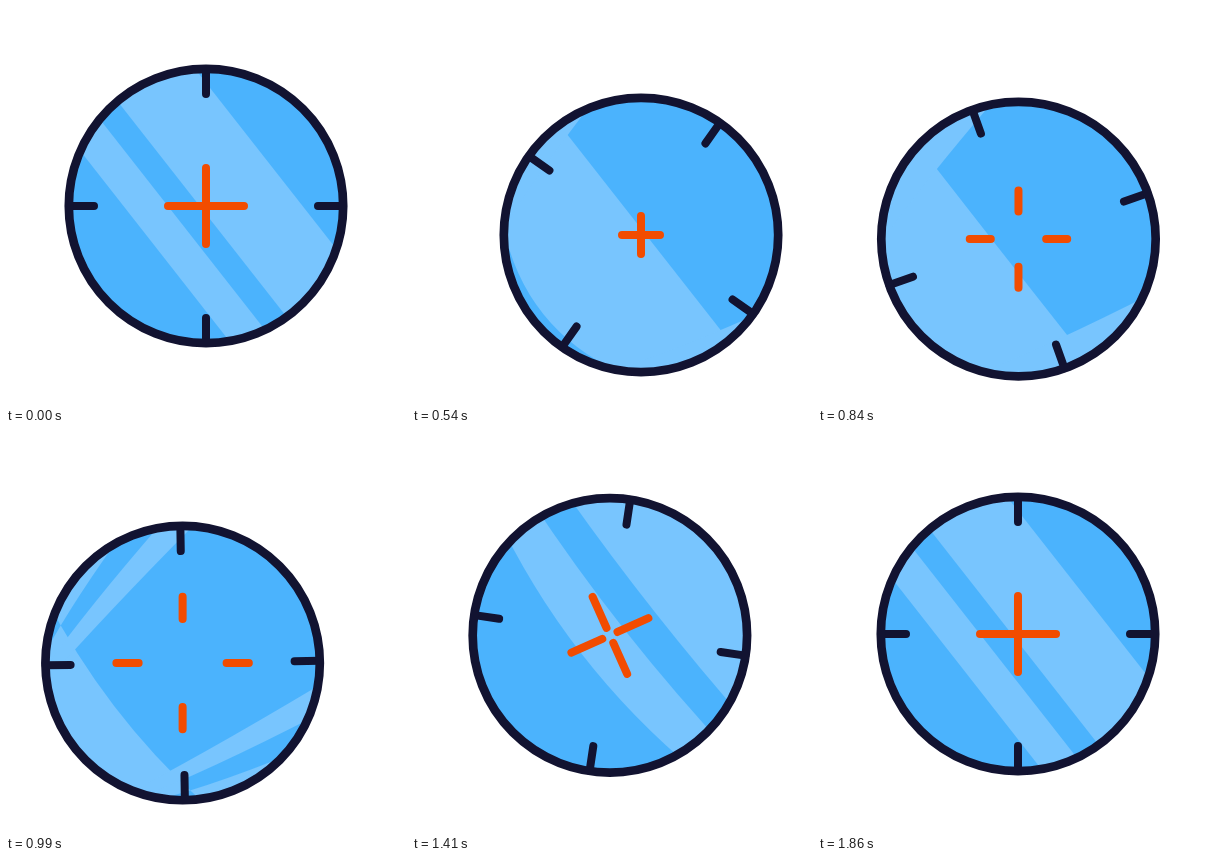
An HTML page with a canvas for the animation above (3.92 s loop, 400 by 400 pixels).

```html
<!DOCTYPE html>
<html>
<head>
<meta charset="utf-8">
<title>Crosshair</title>
<style>
html, body { margin: 0; width: 100%; height: 100%; overflow: hidden; background: #fff; }
canvas { display: block; width: 400px; height: 400px; }
</style>
</head>
<body>
<canvas id="stage"></canvas>
<script>
const LOOP = 3920, STEP = 30, END = 1860;
const INK = '#121331', BLUE = '#4bb3fd', SHINE = '#78c5fe', RED = '#f24c00';
const RAD = Math.PI / 180, TILT = 51.9 * RAD;
const R = 137.2;

// Moments when the lens changes direction.
const AWAY = 400, SWING = 600, TURN = 1080, HOME = 1470;

const canvas = document.getElementById('stage');
const ctx = canvas.getContext('2d');
const dpr = window.devicePixelRatio || 1;
canvas.width = canvas.height = 400 * dpr;

const mix = (a, b, s) => a + (b - a) * s;

// Eased progress from 0 at time a to 1 at time b.
function ease(t, a, b) {
  const u = Math.min(1, Math.max(0, (t - a) / (b - a)));
  return u * u * (3 - 2 * u);
}

function curve([a, b, c, d], s) {
  const r = 1 - s;
  return a * r * r * r + 3 * b * r * r * s + 3 * c * r * s * s + d * s * s * s;
}

function lensAt(t) {
  if (t < SWING) {
    const s = ease(t, 0, AWAY);
    return [curve([200, 210, 228, 229], s), curve([200, 205, 220, 229], s)];
  }
  if (t < TURN) {
    const s = ease(t, SWING, TURN);
    return [curve([229, 214.4, 186.4, 172.4], s), curve([229, 235.6, 233.9, 227.4], s)];
  }
  const s = ease(t, TURN, HOME);
  return [curve([172.4, 177.4, 189, 200], s), curve([227.4, 217.4, 207, 200], s)];
}

// Shine edges at rest, as distances from the lens centre.
const bands = [[76, -5], [-30, -65]];

// Before the turn the bands spread and slide out at the lower left.
function leaving(rest, t) {
  const go = ease(t, 0, AWAY);
  const slide = Math.max(0, (t - 660) / 460);
  const pos = mix(rest, 4 + 1.6 * (rest - 76), go) - 164 * slide ** 2;
  return { pos, bend: 1.35 * go * Math.max(0, -pos / 100) ** 3 };
}

// After it they come in from the upper right, straighten and settle.
function entering(rest, t) {
  const q = (END - t) / 630, lag = rest + 65;
  const pos = rest + 61 * q ** 2 + 1.5 * lag * q ** 4 + 10 * q ** 12;
  return { pos, bend: 2.6 / (1 + lag / 22) * Math.min(1, q) ** 4 };
}

function drawBand(band, t) {
  const V = 170, motion = t < TURN ? leaving : entering;
  ctx.beginPath();
  band.forEach((rest, i) => {
    const { pos, bend } = motion(rest, t);
    const bow = bend / 1000 * V * V, side = i ? -V : V;
    ctx.lineTo(-side, -pos - bow);
    ctx.quadraticCurveTo(0, bow - pos, side, -pos - bow);
  });
  ctx.fill();
}

// Four radial strokes between two radii.
function spokes(inner, outer, turn, color) {
  ctx.strokeStyle = color;
  ctx.beginPath();
  for (let i = 0; i < 4; i++) {
    const a = (turn + i * 90) * RAD, c = Math.cos(a), s = Math.sin(a);
    ctx.moveTo(inner * c, inner * s);
    ctx.lineTo(outer * c, outer * s);
  }
  ctx.stroke();
}

function drawCross(t) {
  const open = ease(t, 540, TURN);
  const gap = 47.5 * (open - ease(t, TURN, 1530));
  const back = ease(t, TURN, 1580);
  const arm = 38 - 19 * ease(t, 0, AWAY) + 3.5 * open + 15.5 * back;
  spokes(gap, gap + arm, 90 * back, RED);
}

function drawTicks(t) {
  const turn = -60 * ease(t, 0, 410) + 72 * ease(t, 410, 1205) - 12 * ease(t, 1205, 1780);
  spokes(112, 137, turn, INK);
}

function disc() {
  ctx.beginPath();
  ctx.arc(0, 0, R, 0, 2 * Math.PI);
}

function draw(t) {
  ctx.setTransform(dpr, 0, 0, dpr, 0, 0);
  ctx.fillStyle = '#fff';
  ctx.fillRect(0, 0, 400, 400);
  ctx.translate(...lensAt(t));
  ctx.lineCap = 'round';

  ctx.save();
  disc();
  ctx.clip();
  ctx.fillStyle = BLUE;
  ctx.fillRect(-R, -R, 2 * R, 2 * R);
  ctx.rotate(TILT);
  ctx.fillStyle = SHINE;
  for (const band of bands) drawBand(band, t);
  ctx.restore();

  ctx.lineWidth = 8;
  drawCross(t);
  drawTicks(t);
  ctx.lineWidth = 8.7;
  disc();
  ctx.stroke();
}

function frame() {
  const t = performance.now() % LOOP;
  draw(Math.min(END, Math.floor(t / STEP) * STEP));
  requestAnimationFrame(frame);
}
frame();
</script>
</body>
</html>
```
